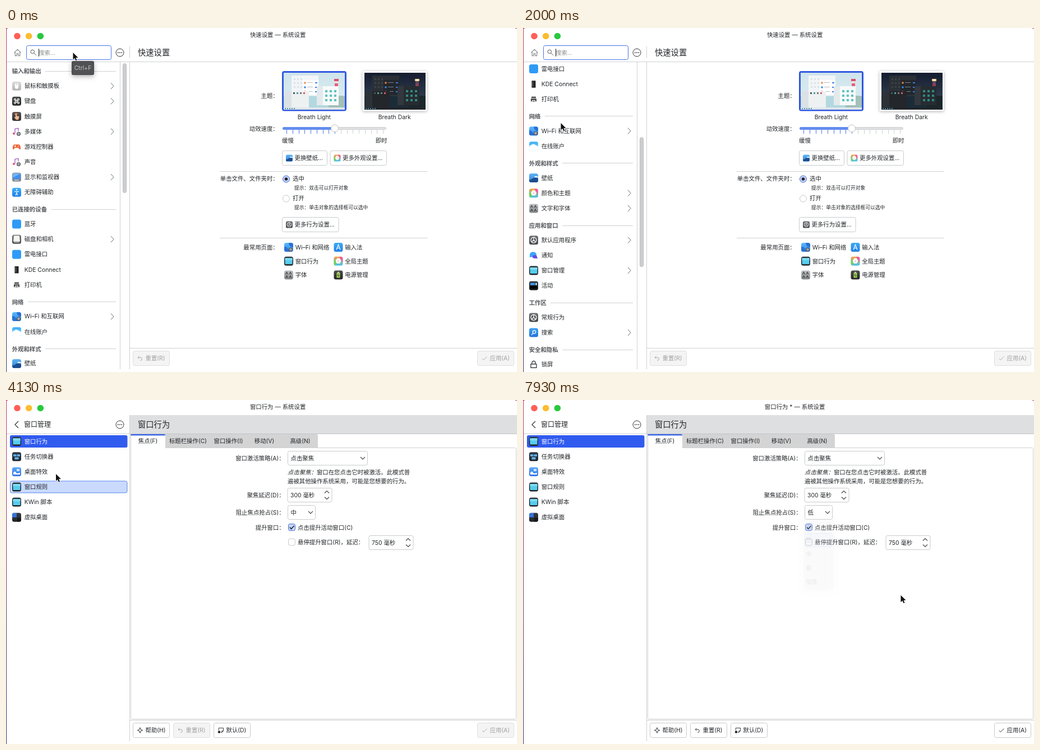
Write an HTML page with a canvas that moves like this. It is 911 by 615 pixels and loops after 8 s.

```html
<!DOCTYPE html>
<html lang="zh-CN">
<head>
<meta charset="utf-8">
<style>
html, body { margin: 0; width: 911px; height: 615px; overflow: hidden; background: #fff; }
canvas { display: block; }
</style>
</head>
<body>
<canvas id="stage" width="911" height="615"></canvas>
<script>
const g = document.getElementById('stage').getContext('2d');
const INK = '#232629', LINE = '#cfd0d2', BLUE = '#315bef', EM = 10.4, PITCH = 27.15;

// Icons on a 16-unit grid: [tile top, tile bottom, ...[fill|stroke, colour, path]]
const GEAR = [['f', '#4a4f56', 'M8 12a3.5 3.5 0 1 0 7 0a3.5 3.5 0 1 0-7 0'], ['s', '#ddd', 'M10 12a1.5 1.5 0 1 0 3 0a1.5 1.5 0 1 0-3 0']];
const icons = {
  mouse: ['#dcdcdc', '#b5b5b5', ['f', '#fff', 'M5 6a3 3 0 0 1 6 0v4a3 3 0 0 1-6 0z'], ['s', '#999', 'M8 4v2']],
  keys: ['#4a4a4a', '#252525', ['s', '#fff', 'M6.5 6.5h3v3h-3zM6.5 6.5H5A1.5 1.5 0 1 1 6.5 5zM9.5 6.5V5A1.5 1.5 0 1 1 11 6.5zM9.5 9.5H11A1.5 1.5 0 1 1 9.5 11zM6.5 9.5V11A1.5 1.5 0 1 1 5 9.5z']],
  touch: ['#5a5558', '#2f2c30', ['f', '#f3b58c', 'M6 3q1-1 2 0v4l4 1q1 1 0 3l-1 3H7L4 10q0-1.5 2-.5z'], ['s', '#e0703a', 'M4.5 5a2.5 2.5 0 0 1 5 0']],
  media: [0, 0, ['s', '#9b4fc0', 'M5 11V3l6-1v5'], ['f', '#e2557b', 'M1 11.5a2 2 0 1 0 4 0a2 2 0 1 0-4 0'], ...GEAR],
  game: [0, 0, ['f', '#f0663a', 'M4 4h8q2 0 3 5q.5 4-1.5 4L11 10H5l-2.5 3Q.5 13 1 9q1-5 3-5z'], ['s', '#fff', 'M4 7h3M5.5 5.5v3M10.5 7h1.5']],
  display: ['#9ba6b3', '#77818d', ['f', '#3f8ff0', 'M1.5 2h13v9.5h-13z'], ['f', '#71b5fa', 'M1.5 2h13L1.5 9z'], ['f', '#ddd', 'M4 13h8v1.2H4z']],
  access: ['#3db0fa', '#1f7de8', ['f', '#fff', 'M6.8 3.5a1.2 1.2 0 1 0 2.4 0a1.2 1.2 0 1 0-2.4 0'], ['s', '#fff', 'M4 6.5l4 .5 4-.5M8 7v3l-2 3.5M8 10l2 3.5']],
  plain: ['#2f9bf6', '#2f9bf6'],
  disk: ['#777', '#444', ['f', '#f4f4f1', 'M3 1.5h10l1 10.5H2z'], ['f', '#bbb', 'M3 12.5h10v1.5H3z']],
  phone: [0, 0, ['f', '#222', 'M4.5 2h7v12.5h-7z'], ['f', '#555', 'M5.5 3.5h2v9h-2z']],
  printer: [0, 0, ['f', '#444', 'M3 7h10v5H3zM4 3.5h8V6H4z'], ['f', '#eee', 'M5 9.5h6v4H5z'], ['s', '#444', 'M6 11.5h4']],
  net: ['#5cbafb', '#3089e8', ['f', '#2a70d6', 'M0 7q5 0 6 3t5 6H3q-3 0-3-3zM8 0h5q3 0 3 3v5q-7 0-8-8z'], ...GEAR],
  cloud: ['#35adf7', '#a9dcfb', ['f', '#fff', 'M0 10q1-4 4-4q2-3 6-1q2 2 4 2q2 1 2 3v3q0 3-3 3H3q-3 0-3-3z']],
  wall: ['#5fb4f6', '#3382d6', ['f', '#1c4d90', 'M0 11q3 1 6-2t10 0v4q0 3-3 3H3q-3 0-3-3z'], ['f', '#fff', 'M9 7q1-3 4-2q3 0 3 2z']],
  color: ['#f9a03f', '#46c4ee', ['f', '#f15aa5', 'M9 0h4q3 0 3 3v7z'], ['f', '#72d060', 'M0 5l8 4-6 7Q0 15 0 13z'], ['f', '#fff', 'M8 3q3-1 3 2q3 1 1 4q0 4-4 3q-4 1-4-3q-2-3 1-4q0-3 3-2z'], ['f', '#f6c3de', 'M6.5 8a1.5 1.5 0 1 0 3 0a1.5 1.5 0 1 0-3 0']],
  font: ['#c0c3c5', '#85888b', ['s', '#444', 'M2.5 7l2-4 2 4M9 7l2-4 2 4M2.5 13.5l2-4 2 4M9 13.5l2-4 2 4']],
  apps: ['#707276', '#47494d', ['s', '#fff', 'M3 8a5 5 0 1 0 10 0a5 5 0 1 0-10 0M8 8V3.5M8 8l-3.5 3M8 8l3.5 3']],
  note: [0, 0, ['f', '#3aa6f6', 'M1 7a6 5 0 1 1 12 0a6 5 0 0 1-9 4l-3 1z'], ['f', '#6a4ae8', 'M6 11a4 3.3 0 1 1 8 0l1 3-3-.5q-5 1-6-2.5z']],
  win: ['#2d3338', '#1d2125', ['f', '#56cdee', 'M1.5 2.5h13v11h-13z'], ['f', '#7cdcf3', 'M1.5 2.5h13v4h-13z']],
  act: ['#35393f', '#181a1d', ['f', '#3f97ef', 'M2 3h8v4H2z'], ['f', '#8fd0ff', 'M11 3h3v4h-3z'], ['f', '#000', 'M2 8h12v5H2z']],
  find: ['#3fa4f5', '#2071d8', ['s', '#fff', 'M6.3 7a2.7 2.7 0 1 0 5.4 0a2.7 2.7 0 1 0-5.4 0M7 9l-3 3.5']],
  lock: [0, 0, ['s', INK, 'M3 7.5h10v6.5H3zM5 7V5a3 3 0 0 1 6 0v2']],
  safe: ['#b78268', '#80503e', ['f', '#e1d2c6', 'M2 12L12 3l2 2-7 9z'], ['f', '#d97f50', 'M2 3h5v4H2z']],
  recent: [0, 0, ['s', INK, 'M3 5l5 4 5-5M8 9v4']],
  tasks: ['#333b44', '#1f252b', ['f', '#62b3f4', 'M2 4h5.5v3.5H2zM8.5 4H14v3.5H8.5zM4.5 9h7v4h-7z']],
  effects: ['#5ba9fa', '#2f6fe0', ['f', '#fff', 'M2 10q1-3 4-2l2 3 6-1v3H2z'], ['f', '#cfe5ff', 'M8 3h5v4H8z']],
  desks: ['#353b43', '#20242a', ['f', '#3773d8', 'M0 4q0-4 4-4h4v8H0z'], ['f', '#16191d', 'M9 9h7v4q0 3-3 3H9z']],
  input: ['#3fabf7', '#2180e4', ['s', '#fff', 'M4.5 12.5L8 3.5l3.5 9M5.8 9.5h4.4']],
  power: ['#4b4d4e', '#242627', ['f', '#a6cf5a', 'M5 4h6v9H5z'], ['f', '#ddd', 'M6.5 2.5h3V4h-3z'], ['s', '#4c7d24', 'M8 6L6.5 9h3L8 11.5']],
  undo: [0, 0, ['s', INK, 'M6 3L3 6l3 3M3 6h6a3.5 3.5 0 0 1 0 7H8']],
  help: [0, 0, ['s', INK, 'M8 1.5l1.7 4.8L14.5 8l-4.8 1.7L8 14.500l-1.7-4.8L1.5 8l4.8-1.7z']],
  reset: [0, 0, ['s', INK, 'M3 8V2.5h11v7L10.5 13H8M14 9.5h-3.5V13'], ['f', INK, 'M1 12a3 3 0 1 0 6 0a3 3 0 1 0-6 0']],
  check: [0, 0, ['s', INK, 'M2.5 8.5l3.5 3.5 8-8']],
  home: [0, 0, ['s', '#85878a', 'M1.5 8.5L8 2l6.5 6.5M3.5 7v7H6.5V10h3v4h3V7']],
  glass: [0, 0, ['s', '#555', 'M2.5 6.5a4 4 0 1 0 8 0a4 4 0 1 0-8 0M9.5 9.5l5 5']]
};

const sections = [
  ['输入和输出', '鼠标和触摸板|mouse|>', '键盘|keys|>', '触摸屏|touch', '多媒体|media|>', '游戏控制器|game', '声音|media', '显示和监视器|display|>', '无障碍辅助|access'],
  ['已连接的设备', '蓝牙|plain', '磁盘和相机|disk|>', '雷电接口|plain', 'KDE Connect|phone', '打印机|printer'],
  ['网络', 'Wi–Fi 和互联网|net|>', '在线账户|cloud'],
  ['外观和样式', '壁纸|wall', '颜色和主题|color|>', '文字和字体|font|>'],
  ['应用和窗口', '默认应用程序|apps|>', '通知|note', '窗口管理|win|>', '活动|act'],
  ['工作区', '常规行为|apps', '搜索|find|>'],
  ['安全和隐私', '锁屏|lock', 'KDE 密码库|safe', '最近文件|recent']
];
const windowPages = ['窗口行为|win', '任务切换器|tasks', '桌面特效|effects', '窗口规则|win', 'KWin 脚本|win', '虚拟桌面|desks'];
const levels = ['无', '低', '中', '高', '彻底'];

// Keyframes: time, then values
const pointer = [[0, 119.5, 44], [70, 119.5, 44], [450, 84, 48], [870, 47, 58], [930, 50, 92], [1000, 58, 130], [1130, 67.5, 170],
  [2350, 67.5, 170], [2550, 72, 240], [2730, 78, 322], [2800, 80, 336.5], [3070, 62, 370], [3130, 60, 371], [3870, 60, 371],
  [4060, 85, 157], [4130, 89, 132.5], [4330, 97, 106], [4530, 110, 100], [4800, 170, 118], [5000, 240, 152], [5070, 262, 161.5],
  [5200, 262, 161.5], [5670, 543, 201], [6270, 543, 201], [6530, 554, 222], [7000, 554, 222], [7270, 560, 249], [7670, 560, 249], [7930, 673.5, 349]];
const scrolling = [[1340, 0], [1500, 70], [1700, 180], [2000, 331.5], [2130, 368], [2330, 388.5]];

function at(keys, t) {
  const i = keys.findIndex(k => k[0] > t);
  if (i < 0) return keys[keys.length - 1].slice(1);
  if (!i) return keys[0].slice(1);
  const a = keys[i - 1], b = keys[i], p = (t - a[0]) / (b[0] - a[0]);
  return a.slice(1).map((v, j) => v + (b[j + 1] - v) * p);
}
const ramp = (t, a, b) => Math.max(0, Math.min(1, (t - a) / (b - a)));

function text(s, x, y, o = {}) {
  const size = o.size || EM;
  g.font = `${o.style || ''} ${size}px Inter, "Noto Sans CJK SC", "Noto Sans CJK", sans-serif`;
  g.fillStyle = o.color || INK;
  g.textAlign = o.align || 'left';
  g.fillText(s, x, y + size * .37);
  return g.measureText(s).width;
}
function box(x, y, w, h, r, fill, stroke, lw = 1) {
  g.beginPath();
  g.roundRect(x, y, w, h, r);
  if (fill) { g.fillStyle = fill; g.fill(); }
  if (stroke) { g.strokeStyle = stroke; g.lineWidth = lw; g.stroke(); }
}
function rect(x, y, w, h, c) { g.fillStyle = c; g.fillRect(x, y, w, h); }
function disc(x, y, r, fill, stroke) { box(x - r, y - r, 2 * r, 2 * r, r, fill, stroke); }
function poly(points, color, lw = 1.1) {
  g.beginPath();
  points.forEach(p => g.lineTo(...p));
  g.strokeStyle = color; g.lineWidth = lw; g.stroke();
}
function shade(color, blur, dy, draw) {
  g.save();
  g.shadowColor = color; g.shadowBlur = blur; g.shadowOffsetY = dy;
  draw();
  g.restore();
}
function icon(name, x, y, size = 16) {
  const [top, bottom, ...layers] = icons[name];
  g.save();
  g.translate(x - size / 2, y - size / 2);
  g.scale(size / 16, size / 16);
  if (top) {
    const fill = g.createLinearGradient(0, 0, 0, 16);
    fill.addColorStop(0, top); fill.addColorStop(1, bottom);
    box(0, 0, 16, 16, 3.5, fill);
    g.clip();
  }
  g.lineWidth = 1.2;
  for (const [mode, color, d] of layers) {
    g.fillStyle = g.strokeStyle = color;
    g[mode === 'f' ? 'fill' : 'stroke'](new Path2D(d));
  }
  g.restore();
}
const chevron = (x, y) => poly([[x - 2.5, y - 5.5], [x + 2.5, y], [x - 2.5, y + 5.5]], '#55585b', .9);
const arrow = (x, y, d = 1) => poly([[x - 4, y - 2 * d], [x, y + 2 * d], [x + 4, y - 2 * d]], '#444');

function button(x, y, w, label, name, enabled = true) {
  box(x + .5, y + .5, w - 1, 26, 3, enabled ? '#fff' : '#f4f4f4', enabled ? '#c9cacc' : '#dedede');
  g.globalAlpha = enabled ? 1 : .4;
  icon(name, x + 13, y + 13.5, 12);
  text(label, x + 22.5, y + 13.5);
  g.globalAlpha = 1;
}
function row(item, y, right, state) {
  const [label, name, more] = item.split('|');
  if (state === 'hover') box(7.5, y - 10.5, right - 8, 21, 3, '#cadafc', '#5a86f0');
  if (state === 'selected') box(7, y - 11, right - 7, 22, 3, BLUE);
  icon(name, 19, y);
  text(label, 32.7, y - .3, { color: state === 'selected' ? '#fff' : INK });
  if (more) chevron(189.5, y);
}

function sidebarHome(t, hover) {
  const scroll = at(scrolling, t)[0];
  icon('home', 20.5, 44, 15);
  box(36.5, 31.5, 151, 25, 3, '#fff', '#4674ea');
  icon('glass', 48.5, 43.5, 13);
  text('搜索…', 58, 44, { color: '#8a8c8f' });
  if ((t + 450) % 1000 < 500 || t > 3430) rect(58, 37, 1, 14, INK);

  g.save();
  g.beginPath(); g.rect(0, 61, 203, 550); g.clip();
  let y = 77.5 - scroll;
  for (const [title, ...items] of sections) {
    const w = text(title, 10.7, y, { style: 'bold', color: '#55585c' });
    rect(18 + w, Math.round(y - .5), 178 - w, 1, LINE);
    y += 26.2;
    for (const item of items) {
      const over = hover && hover[0] < 203 && Math.abs(hover[1] - y) < PITCH / 2;
      const pressed = t > 3430 && item.startsWith('窗口管理');
      row(item, y, 200, pressed ? 'selected' : over ? 'hover' : '');
      y += PITCH;
    }
    y += 30.6 - PITCH;
  }
  g.restore();
  rect(203, 61, 1, 549, LINE);
  // The thumb trails the list slightly
  box(208.5, 63.5 + at(scrolling, t - 25)[0] * .414, 6, 231, 3, '#cdcecf', '#bbbcbe');
}
function sidebarWindows(hover) {
  poly([[22, 38], [16, 44], [22, 50]], INK);
  text('窗口管理', 32, 44, { size: 12 });
  windowPages.forEach((item, i) => {
    const y = 74 + PITCH * i;
    const over = hover && hover[0] < 217 && Math.abs(hover[1] - y) < PITCH / 2;
    row(item, y, 216.5, i ? over ? 'hover' : '' : 'selected');
  });
}

function preview(x, dark) {
  const y = 80, c = (a, b) => dark ? b : a;
  const sky = g.createLinearGradient(0, y, 0, y + 66);
  sky.addColorStop(0, c('#cfe4ec', '#151d2f'));
  sky.addColorStop(.6, c('#d6eaee', '#2b394b'));
  sky.addColorStop(1, c('#9cc9d6', '#14202c'));
  g.save();
  g.beginPath(); g.rect(x, y, 109, 66); g.clip();
  rect(x, y, 109, 66, sky);
  rect(x, y + 42, 109, 24, c('#b3d8e0', '#1c2b38'));
  g.beginPath(); g.ellipse(x + 102, y + 60, 22, 19, 0, 0, 7);
  g.fillStyle = c('#a3c0b8', '#1a272b'); g.fill();
  const tower = x + 91;
  rect(tower, y + 15, 6, 26, c('#f3dedc', '#5a4858'));
  for (const dy of [19, 29]) rect(tower, y + dy, 6, 5, c('#e2607a', '#8c4058'));
  rect(tower - 1, y + 11, 8, 4, c('#d94e6c', '#e8c890'));
  if (dark) disc(tower + 3, y + 13, 2, '#fff2b8');
  // Icon view, list, launcher and folder windows
  rect(x + 14, y + 5, 48, 36, c('#f2f5f7', '#2b3036'));
  for (let i = 0; i < 9; i++) rect(x + 18 + i % 3 * 6, y + 10 + (i / 3 | 0) * 7, 3, 3, c('#dbe2e7', '#3c434a'));
  rect(x + 34, y + 13, 28, 26, c('#fff', '#22272d'));
  for (let i = 0; i < 3; i++) {
    disc(x + 38, y + 18 + i * 8, 1.8, ['#f08347', '#3688df', '#e45d51'][i]);
    rect(x + 42, y + 17 + i * 8, 10, 1, c('#b5bbc1', '#7b828a'));
    rect(x + 56, y + 17 + i * 8, 4, 2, '#3d7bea');
  }
  rect(x + 1, y + 33, 44, 29, c('#edf1f2', '#23272c'));
  rect(x + 1, y + 33, 13, 29, c('#dbe2e5', '#2c3237'));
  for (let i = 0; i < 4; i++) rect(x + 17 + i * 6, y + 35, 3, 3, ['#555', '#46a3a5', '#777', '#d95a66'][i]);
  rect(x + 59, y + 24, 39, 34, c('#f8fafa', '#272c31'));
  rect(x + 59, y + 24, 11, 34, c('#e4eaec', '#32383e'));
  for (let i = 0; i < 9; i++) rect(x + 74 + i % 3 * 8, y + 31 + (i / 3 | 0) * 8, 4, 4, c('#5cc3bf', '#2f8a82'));
  rect(x, y + 62, 109, 4, c('#dfe6e9', '#20252a'));
  for (let i = 0; i < 5; i++) rect(x + 2 + i * 4, y + 63, 2, 2, '#4d8fa5');
  g.restore();
}

function paneQuick() {
  const label = (s, y) => text(s, 485.7, y, { align: 'right' });
  const hint = (s, y) => text(s, 514, y, { size: 8.75, style: '500' });
  text('快速设置', 235, 44, { size: 14.3 });
  rect(220, 33, 1, 21, LINE);
  label('主题：', 121.5);
  box(493.5, 78.5, 112, 68.5, 2.5, '#fff', '#3159e0', 3);
  preview(495, false);
  shade('rgba(0,0,0,.3)', 5, 1, () => box(635.5, 77, 115, 71.5, 3, '#fff'));
  preview(639, true);
  text('Breath Light', 549.3, 159.2, { align: 'center' });
  text('Breath Dark', 692.7, 159.2, { align: 'center' });

  label('动效速度：', 180);
  box(493.5, 177.5, 184, 4, 2, '#dfe0e1', '#d0d1d3');
  box(493, 177, 93, 5, 2.5, '#638dee');
  for (let i = 0; i < 17; i++) rect(Math.round(500 + i * 10.75), 182, 1, 7, i < 9 ? '#5179e8' : '#cfd0d2');
  disc(586, 179.5, 6.5, '#fff', '#c0c1c3');
  text('缓慢', 492, 200.7);
  text('即时', 679.5, 200.7, { align: 'right' });
  button(492, 219, 81, '更换壁纸…', 'wall');
  button(577.5, 219, 101.5, '更多外观设置…', 'color');
  rect(381, 256, 370, 1, LINE);

  label('单击文件、文件夹时：', 269.5);
  disc(499.5, 270, 6, '#c6d6fa', '#4268d8');
  disc(499.5, 270, 2.8, INK);
  text('选中', 511, 269.5);
  hint('提示：双击可以打开对象', 286);
  disc(499.5, 305, 6, '#fff', '#c6c7c9');
  text('打开', 511, 304.5);
  hint('提示：单击对象的选择框可以选中', 321);
  button(492, 338, 101.5, '更多行为设置…', 'apps');
  rect(381, 375, 370, 1, LINE);

  label('最常用页面：', 392);
  ['Wi–Fi 和网络|net', '输入法|input', '窗口行为|win', '全局主题|color', '字体|font', '电源管理|power'].forEach((s, i) => {
    const [name, pic] = s.split('|'), x = 504 + i % 2 * 88.5, y = 392 + (i >> 1) * 24.7;
    icon(pic, x, y);
    text(name, x + 11.7, y);
  });
  button(226, 577, 66, '重置(R)', 'undo', false);
  button(840, 577, 66, '应用(A)', 'check', false);
}

function paneWindows(changed) {
  const label = (s, y) => text(s, 496.7, y, { align: 'right' });
  const field = (x, y, w, s) => { box(x + .5, y + .5, w - 1, 25, 3, '#fff', '#c9cacc'); text(s, x + 5.5, y + 13); };
  const spin = (x, y, s) => { field(x, y, 80, s); arrow(x + 70.5, y + 7.5, -1); arrow(x + 70.5, y + 18.5); };
  rect(221, 27, 690, 33, '#dedfe1');
  rect(220, 60, 691, 1, '#c3c4c6');
  text('窗口行为', 235, 44, { size: 14.3 });
  box(284, 61, 272, 24, [0, 3, 0, 0], '#d4d4d5');
  box(222.5, 85.5, 687, 485, 2, '#fff', LINE);
  rect(222, 61, 62, 25, '#fff');
  rect(222, 61, 1, 25, LINE);
  box(222, 61, 62, 2.5, [2, 2, 0, 0], '#3b68e6');
  ['焦点(F)', '标题栏操作(C)', '窗口操作(I)', '移动(V)', '高级(N)'].forEach((s, i) =>
    text(s, [253, 324.5, 396.5, 460.5, 524.5][i], 73, { align: 'center' }));

  label('窗口激活策略(A)：', 104);
  field(502, 91, 143, '点击聚焦');
  arrow(636, 104);
  const w = text('点击聚焦：', 502, 129.5, { style: 'italic' });
  text('窗口在您点击它时被激活。此模式普', 502 + w, 129.5);
  text('遍被其他操作系统采用，可能是您想要的行为。', 502, 145);
  label('聚焦延迟(D)：', 170.5);
  spin(501.5, 157, '300 毫秒');
  label('阻止焦点抢占(S)：', 201);
  field(502, 188, 50, changed ? '低' : '中');
  arrow(543, 201);
  label('提升窗口：', 228);
  box(503.5, 221.5, 12, 12, 3, '#c6d6fa', '#4268d8');
  poly([[506, 227.5], [508.5, 230.5], [513.5, 225]], INK, 1.7);
  text('点击提升活动窗口(C)', 520, 228);
  box(503.5, 248, 12, 12, 3, '#fff', '#c6c7c9');
  text('悬停提升窗口(R)，延迟：', 520, 254.5);
  spin(646.5, 242, '750 毫秒');

  button(226, 577, 66, '帮助(H)', 'help');
  button(298, 577, 66, '重置(R)', 'undo', changed);
  button(370, 577, 66, '默认(D)', 'reset');
  button(840, 577, 66, '应用(A)', 'check', changed);
}

function popup(t) {
  const alpha = t < 7000 ? ramp(t, 5900, 6050) : 1 - ramp(t, 7720, 7950);
  if (!alpha) return;
  const current = t < 6400 ? 2 : t < 7170 ? 0 : 1;
  g.globalAlpha = alpha;
  shade('rgba(0,0,0,.25)', 8, 2, () => box(501.5, 212.5, 51, 125, 3, '#fff'));
  box(501.5, 212.5, 51, 125, 3, '#fff', '#d3d4d6');
  levels.forEach((s, i) => {
    const y = 225.5 + i * 25;
    if (i === current) box(502.5, y - 12, 49, 24, 3, '#cadafc', '#5a86f0');
    text(s, 504, y);
  });
  g.globalAlpha = 1;
}

function drawPointer(x, y) {
  g.save();
  g.translate(x, y);
  const shape = new Path2D('M0 0V12.5L2.9 9.8L5 14.3L7 13.4L5 9H9z');
  g.lineJoin = 'round'; g.lineWidth = 1.6; g.strokeStyle = '#fff'; g.stroke(shape);
  g.fillStyle = '#111'; g.fill(shape);
  g.restore();
}

function draw(t) {
  const second = t >= 3760, changed = t >= 7700;
  const slide = 1 - (1 - ramp(t, 3650, 3870)) ** 2;
  const hover = t > 1340 && t < 2420 || slide > 0 && slide < 1 ? null : at(pointer, t - 70);
  rect(0, 0, 911, 615, '#fff');

  ['#ff5f57', '#f9bd2e', '#28c840'].forEach((c, i) => disc(20 + i * 20.7, 14.5, 5.8, c));
  const title = (second ? '窗口行为' : '快速设置') + (changed ? ' * — ' : ' — ') + '系统设置';
  text(title, 484.6, 12.6, { align: 'center' });

  rect(1, 60, 910, 1, LINE);
  if (second) paneWindows(changed); else paneQuick();
  rect(220, 572, 691, 1, LINE);
  rect(220, second ? 27 : 60, 1, second ? 583 : 550, LINE);

  g.save();
  g.beginPath(); g.rect(0, 27, 220, 584); g.clip();
  if (slide < 1) { g.save(); g.translate(-220 * slide, 0); sidebarHome(t, hover); g.restore(); }
  if (slide > 0) { g.save(); g.translate(220 * (1 - slide), 0); sidebarWindows(hover); g.restore(); }
  g.restore();
  disc(203, 44, 7, '#fff', '#333');
  for (let i = -1; i < 2; i++) disc(203 + i * 3.2, 44, .9, '#333');

  const tip = 1 - ramp(t, 270, 470);
  if (tip) {
    g.globalAlpha = tip;
    shade('rgba(0,0,0,.3)', 8, 3, () => box(117, 59, 40, 25, 3, '#505254'));
    box(117.5, 59.5, 39, 24, 3, '#505254', '#444648');
    text('Ctrl+F', 137, 71.6, { align: 'center', color: '#c4c5c6' });
    g.globalAlpha = 1;
  }
  popup(t);

  const edge = g.createLinearGradient(0, 0, 0, 615);
  edge.addColorStop(0, '#c2386c'); edge.addColorStop(.5, '#7a3a78'); edge.addColorStop(1, '#2c3566');
  rect(0, 0, 1, 615, edge);
  rect(0, 0, 3, 1, '#c2386c');
  rect(908, 0, 3, 1, '#b04a80');
  drawPointer(...at(pointer, t));
}

function loop() {
  draw(performance.now() % 8000);
  requestAnimationFrame(loop);
}
loop();
</script>
</body>
</html>
```
